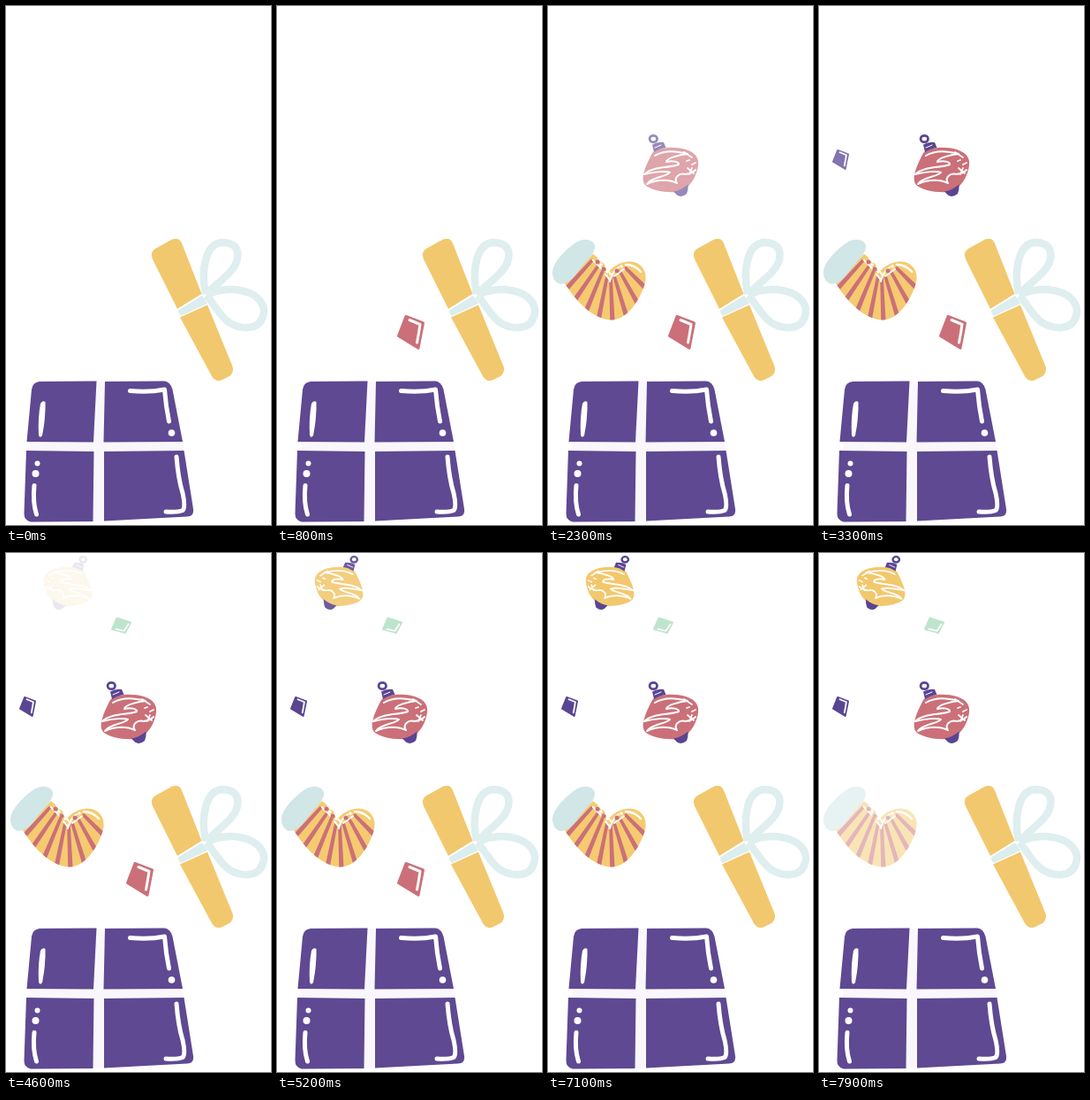
An HTML page that plays this animation: 300 px wide and 586 px high, repeating every 8000 ms.

```html
<!DOCTYPE html>
<html lang="en">
<head>
<meta charset="utf-8">
<title>Gift box</title>
<style>
html, body { margin: 0; width: 100%; height: 100%; overflow: hidden; background: #fff; }
svg { display: block; width: 300px; height: 586px; }
.line { fill: none; stroke: #fff; stroke-linecap: round; stroke-linejoin: round; }
.fade { opacity: 0; }
</style>
</head>
<body>
<svg viewBox="0 0 300 586">
  <defs>
    <g id="gem">
      <path stroke-width="3" stroke-linejoin="round" d="M146 350.500L165.500 358L160 386.300L137.500 372.500Z"/>
      <path class="line" stroke-width="3" d="M150 354.500L162 359.500Q160.500 370 158.500 380"/>
    </g>
    <g id="bauble">
      <path d="M118 166C124 159 143 158 156 162C168 166 172 173 169.500 183C167 195 160 205 150 209.500C136 212 116 208 110 202C105 196 108 185 118 166Z"/>
      <g fill="#5a4593">
        <path d="M118 156.500Q124 153 131 154L133.500 160Q127 160.500 120 165Z"/>
        <path d="M142 209.500Q151 208 158.500 201.500Q159 208 157 212Q151 217 146 213.500Z"/>
        <ellipse cx="119.300" cy="150" rx="4.200" ry="3.700" fill="none" stroke="#5a4593" stroke-width="2.800"/>
      </g>
      <path class="line" stroke-width="1" d="M121 160L128 157"/>
      <path class="line" stroke-width="2" d="M121 169C133 162 146 164 158 167C148 168 134 172 134 176C141 174 149 176 148 179C138 183 118 181 109 190C121 187 134 186 138 188C134 193 117 193 112 201C125 195 138 196 146 200C142 194 148 188 156 190Q163 189 167 185"/>
      <path class="line" stroke-width="1.800" d="M154 165L163 171M157 175L160 174M163 179L167 177M158 183L165 189M163 183L160 190"/>
    </g>
    <clipPath id="body"><path d="M19 313L51 280C58 285 64 291 69.500 299C77 291 88 287 97 289C108 292 113 302 109.500 314C103 335 88 354.500 72 354.500C50 354 30 331 19 313Z"/></clipPath>
  </defs>

  <!-- box -->
  <path fill="#faf7fc" d="M31 425L184 423.500L200 492L210 575L100 582L23 582Z"/>
  <g fill="#5e4992">
    <path d="M29 433Q30 425 38 424L102.500 423.500L99 492.500L23.500 492Z"/>
    <path d="M112 424L179 423.500Q186 424 188.500 433L200 492L110.500 492.500Z"/>
    <path d="M23 502L99.500 503L98.500 582L28 582.500Q20.500 581 20.500 573Z"/>
    <path d="M111 503L201.500 502L212 568Q213 576 205 576.500L111 581.500Z"/>
  </g>
  <g fill="#fff">
    <path d="M39 449Q41 445 44.500 447Q45 465 41 485Q38 489 37 484Q36 465 39 449Z"/>
    <circle cx="187.500" cy="482" r="3.800"/>
    <circle cx="35.500" cy="516.500" r="3"/>
    <circle cx="33.500" cy="528" r="4"/>
  </g>
  <g class="line" stroke-width="5">
    <path d="M140.500 434.500Q162 436.500 179.500 433Q181 452 184.500 469"/>
    <path d="M32 541.500Q30 560 34.500 574"/>
    <path d="M193 509Q195 534 200 550Q203.500 566 200 569.500Q194 572 181 571"/>
  </g>

  <!-- lid and bow -->
  <g fill="#f2c86e">
    <path d="M166 286Q162.500 278 169 274L188 263.500Q196 260.500 199 268L221.500 325L194 342Z"/>
    <path d="M197 351.500L228 337.500L256.500 407Q258.500 414 253 418L244 422.500Q237 425 233 418Z"/>
  </g>
  <g fill="none" stroke="#dfeeee" stroke-width="8.500" stroke-linejoin="round">
    <path d="M226 325C221 302 224 267 246 267C269 268 264 289 254 300C245 310 235 316 227 326"/>
    <path d="M227 327C246 314 292 319 292 345C289 370 263 364 252 357C241 349 237 338 227 327"/>
  </g>
  <path fill="#dbedee" d="M195 343.500L222 327L228 336L198 350Q195 348 195 343.500Z"/>

  <g id="red-gem" class="fade"><use href="#gem" fill="#cb7078" stroke="#cb7078"/></g>

  <g id="sock" class="fade">
    <g clip-path="url(#body)">
      <path fill="#f5ca70" d="M10 270H120V360H10Z"/>
      <path id="stripes" fill="#cb7078"/>
    </g>
    <path fill="#d0e6e7" d="M5 300C6 289 18 277 30 268C38 262 50 262 53 270C54 279 45 286 37 296C30 305 24 314 14 314C7 312 5 306 5 300Z"/>
    <g class="line" stroke-width="2">
      <path d="M51 287L61 297M65 303L70 309M57 285L61 289M65 294L71 303"/>
      <path d="M70 311Q73 299 80 295M75 305L86 297"/>
      <path stroke-width="2.500" d="M88 292Q98 292 105 300"/>
    </g>
    <g fill="#cb7078"><circle cx="56" cy="289" r="2.500"/><circle cx="63" cy="297" r="2.500"/><circle cx="78" cy="299" r="2.500"/></g>
    <g fill="#fff"><circle cx="60" cy="292" r="1.800"/><circle cx="67" cy="300" r="1.800"/><circle cx="83" cy="294" r="1.800"/></g>
  </g>

  <g id="red-bauble" class="fade"><use href="#bauble" fill="#cb7078"/></g>
  <g id="purple-gem" class="fade">
    <use href="#gem" fill="#5a4593" stroke="#5a4593" transform="translate(15 162) scale(.613 .59) translate(-136 -349)"/>
  </g>
  <g id="green-gem" class="fade">
    <path fill="#bfe4cd" stroke="#bfe4cd" stroke-width="2" stroke-linejoin="round" d="M125.500 73.500L141 78.500L135 90L120 86Z"/>
    <path class="line" stroke-width="1.800" d="M138.500 80.500L133.500 88L124.500 85.800"/>
  </g>
  <g id="yellow-bauble" class="fade">
    <use href="#bauble" fill="#f2c86e" transform="matrix(-.873 0 0 .873 191.400 -123.600)"/>
  </g>
</svg>
<script>
const LOOP = 8000;
const $ = id => document.getElementById(id);

// Stripes fan out from the crease: [inner x, y, outer x, y]
const fan = [
  [50, 287, 22, 318], [57, 293, 31, 331], [62, 299, 43, 345], [67, 305, 57, 355],
  [71, 307, 73, 358], [75, 305, 89, 351], [81, 299, 101, 335], [87, 295, 110, 318]
];
$('stripes').setAttribute('d', fan.map(([x, y, u, v]) => {
  const len = Math.hypot(u - x, v - y);
  const nx = (y - v) / len, ny = (u - x) / len;
  const at = (px, py, w) => `${px + nx * w} ${py + ny * w}`;
  return `M${at(x, y, 1.8)}L${at(u, v, 2.7)}L${at(u, v, -2.7)}L${at(x, y, -1.8)}Z`;
}).join(''));

// [id, fade-in start, steps, step length, fade-out start]
const fades = [
  ['red-gem', 100, 8, 100, 6400],
  ['sock', 1000, 8, 100, 7600],
  ['red-bauble', 1900, 8, 100, LOOP],
  ['purple-gem', 2800, 8, 100, LOOP],
  ['green-gem', 3800, 4, 200, LOOP],
  ['yellow-bauble', 4600, 8, 100, LOOP]
].map(([id, ...times]) => [$(id), ...times]);

const level = (t, start, steps, size) =>
  Math.max(0, Math.min(1, (Math.floor((t - start) / size) + 1) / steps));

function draw(now) {
  const t = now % LOOP;
  for (const [el, start, steps, size, end] of fades)
    el.style.opacity = level(t, start, steps, size) - level(t, end, 8, 100);
}

const begin = performance.now();
function tick() {
  draw(performance.now() - begin);
  requestAnimationFrame(tick);
}
tick();
</script>
</body>
</html>
```
